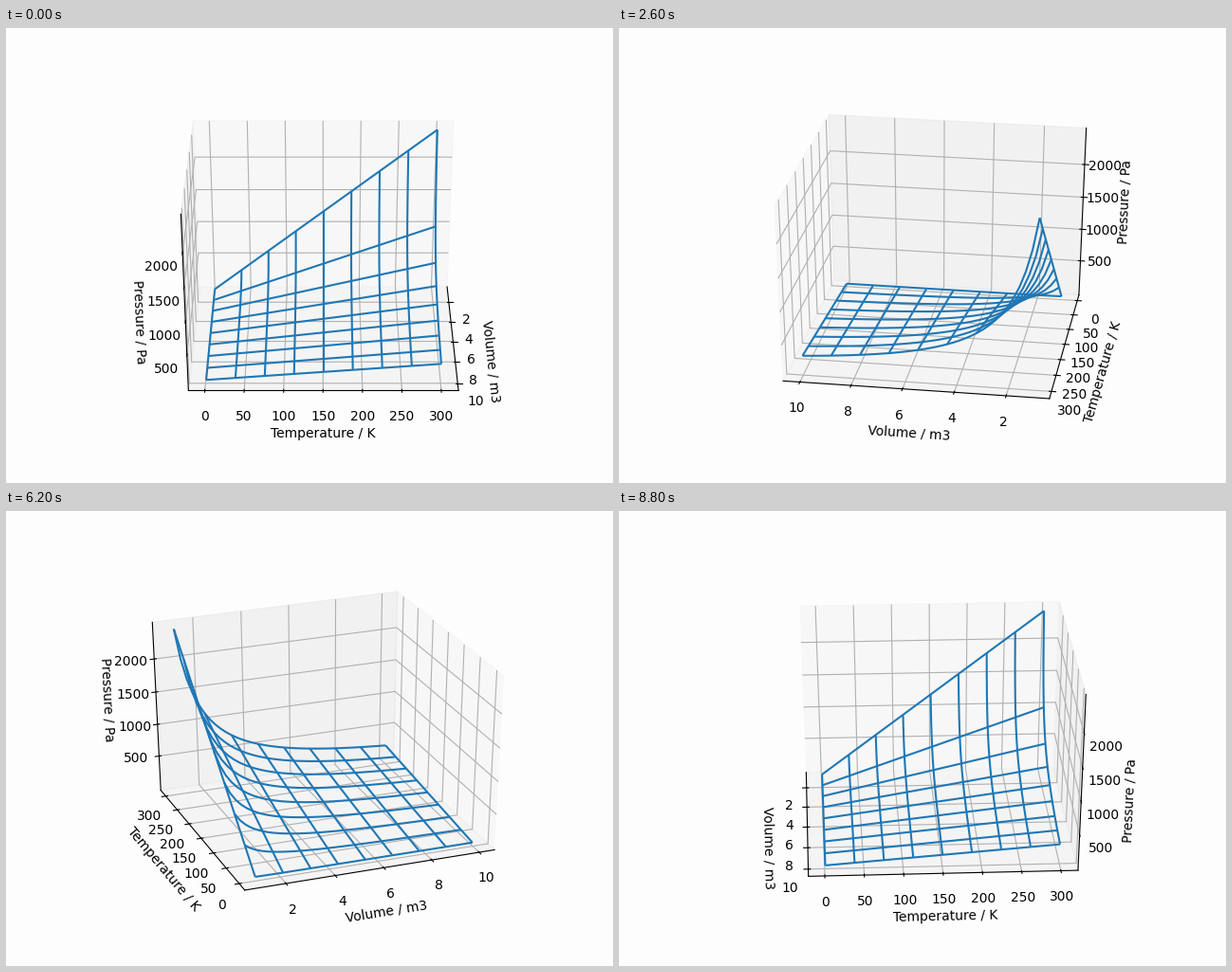
These frames come from a looping animation (640 px wide and 480 px high, 9000 ms). A matplotlib script:

```python
import math

import numpy as np
import matplotlib.pyplot as plt
from matplotlib.animation import FuncAnimation
from mpl_toolkits.mplot3d import Axes3D

FRAMES = 45
INTERVAL = 200      # ms per frame
MS_PER_DEGREE = 24
START_DELAY = 230   # ms before the steady rotation sets in
GAS_CONSTANT = 8.314
BACKGROUND = "#fdfdfd"
# Undoes the library's scaling of the box, leaving a unit cube.
UNIT_ZOOM = math.sqrt(3) / 1.8294640721620434


class WideAxes(Axes3D):
    """3D axes that fill the whole subplot instead of a square in it."""

    def apply_aspect(self, position=None):
        pass


fig = plt.figure(figsize=(6.4, 4.8), dpi=100, facecolor=BACKGROUND)
ax = fig.add_subplot(axes_class=WideAxes, facecolor=BACKGROUND)
ax.set_box_aspect((1, 1, 1), zoom=UNIT_ZOOM)
ax.set_zmargin(0)

volume, temperature = np.meshgrid(np.linspace(1, 10, 41), np.linspace(1, 300, 41))
pressure = GAS_CONSTANT * temperature / volume

ax.plot_wireframe(volume, temperature, pressure, rstride=5, cstride=5)
ax.set_zticks(range(500, 2001, 500))
ax.set_xlabel("Volume / m3")
ax.set_ylabel("Temperature / K")
ax.set_zlabel("Pressure / Pa")


def azimuth(frame):
    """Whole degrees; the first step is small, then the speed is constant."""
    steady = round((frame * INTERVAL - START_DELAY) / MS_PER_DEGREE)
    return max(min(frame, 1), steady)


def update(frame):
    ax.view_init(elev=30, azim=azimuth(frame))
    return []


anim = FuncAnimation(fig, update, frames=FRAMES, interval=INTERVAL,
                     init_func=lambda: update(0), repeat=True, repeat_delay=0)
plt.show()
```
